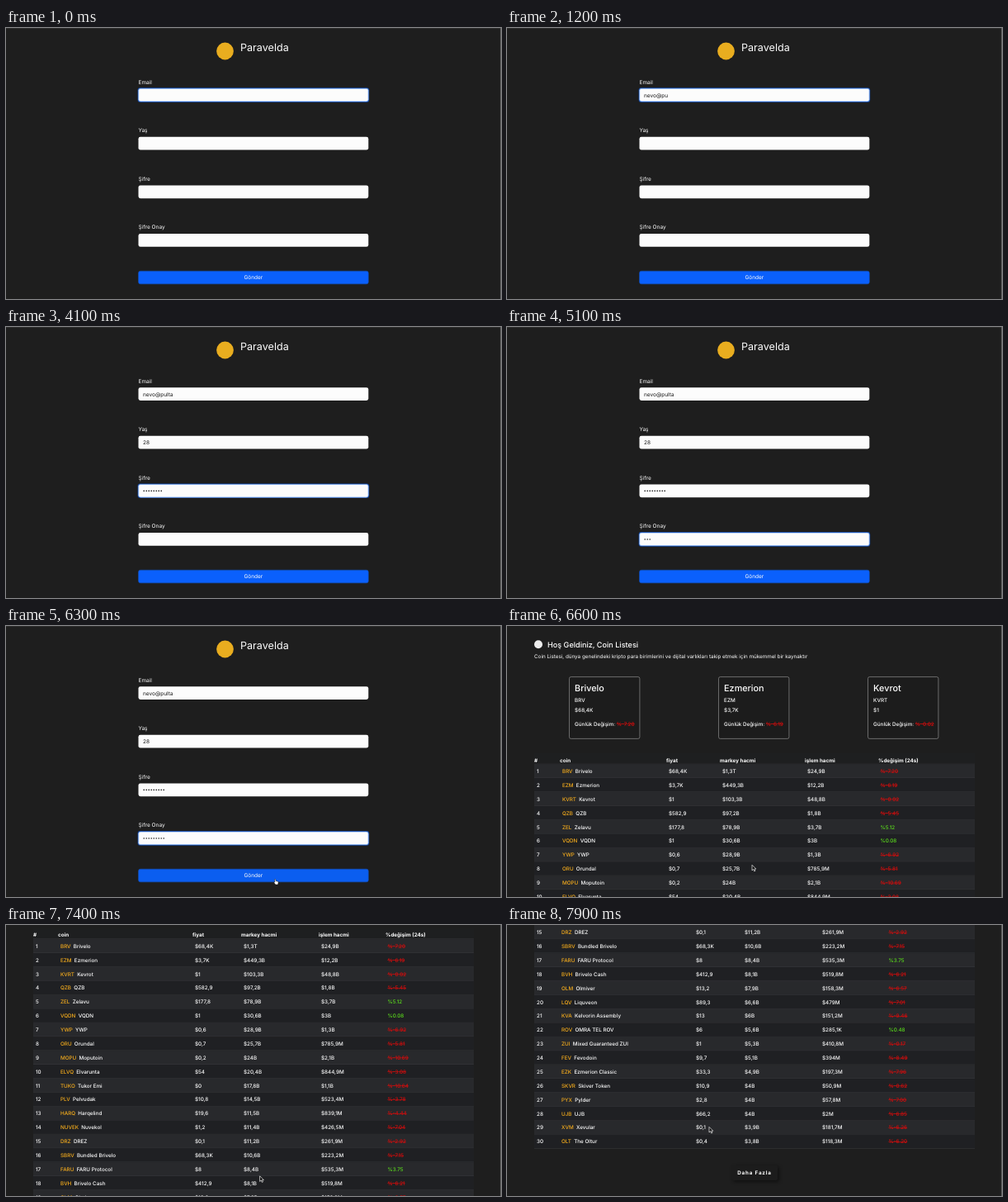
Animation, 600 px wide and 328 px high, one loop 8000 ms. Source, as an HTML page:

```html
<!DOCTYPE html>
<html lang="tr">
<head>
<meta charset="utf-8">
<title>Coin Listesi</title>
<style>
  html, body { margin: 0; width: 100%; height: 100%; overflow: hidden; background: #1e1e1e; }
  svg { display: block; width: 600px; height: 328px; font: 6.5px Inter, "Liberation Sans", sans-serif; fill: #fafafa; }
  text { white-space: pre; text-rendering: geometricPrecision; }
  #list { font-size: 6.3px; font-weight: 500; fill: #fff; }
  .title { font-size: 9.1px; }
  .big { font-size: 10.8px; }
  .head { font-weight: 700; }
  .ticker { fill: #f8ae1c; }
  .up { fill: #5bdc1c; }
  .down { fill: #d60c0c; text-decoration: line-through; }
  .typed { fill: #1b1b1b; }
  .more { filter: drop-shadow(2px 2px 2px rgba(0, 0, 0, .45)); }
</style>
</head>
<body>
<svg id="stage" viewBox="0 0 600 328"></svg>
<script>
const LOOP = 8000, STEP = 100;
const PAGE_AT = 6500, MORE_AT = 7400;
const PITCH = 16.88;
const EMAIL = 'nevo@pulta', AGE = '28';

// ticker | name | price | market volume | trade volume | change
const COINS = `BRV|Brivelo|68,4K|1,3T|24,9B|-7.20
EZM|Ezmerion|3,7K|449,3B|12,2B|-6.19
KVRT|Kevrot|1|103,3B|48,8B|-0.02
QZB|QZB|582,9|97,2B|1,8B|-5.45
ZEL|Zelavu|177,8|78,9B|3,7B|5.12
VQDN|VQDN|1|30,6B|3B|0.08
YWP|YWP|0,6|28,9B|1,3B|-6.92
ORU|Orundal|0,7|25,7B|785,9M|-5.81
MOPU|Moputoin|0,2|24B|2,1B|-10.69
ELVQ|Elvarunta|54|20,4B|844,9M|-3.08
TUKO|Tukor Emi|0|17,8B|1,1B|-10.64
PLV|Pelvudak|10,8|14,5B|523,4M|-3.78
HARQ|Harqelind|19,6|11,5B|839,1M|-4.44
NUVEK|Nuvekol|1,2|11,4B|426,5M|-7.04
DRZ|DREZ|0,1|11,2B|261,9M|-2.92
SBRV|Bundled Brivelo|68,3K|10,6B|223,2M|-7.15
FARU|FARU Protocol|8|8,4B|535,3M|3.75
BVH|Brivelo Cash|412,9|8,1B|519,8M|-6.21
OLM|Olmiver|13,2|7,9B|158,3M|-6.57
LQV|Liquveon|89,3|6,6B|479M|-7.01
KVA|Kelvorin Assembly|13|6B|151,2M|-9.46
ROV|OMRA TEL ROV|6|5,6B|285,1K|0.48
ZUI|Mixed Guaranteed ZUI|1|5,3B|410,8M|-0.17
FEV|Fevodoin|9,7|5,1B|394M|-8.49
EZK|Ezmerion Classic|33,3|4,9B|197,3M|-7.96
SKVR|Skiver Token|10,9|4B|50,9M|-0.62
PYX|Pylder|2,8|4B|57,8M|-7.00
UJB|UJB|66,2|4B|2M|-6.85
XVM|Xevular|0,1|3,9B|181,7M|-6.26
OLT|The Oltur|0,4|3,8B|118,3M|-6.20`.split('\n').map(row => row.split('|'));

const text = (x, y, s, attrs = '') => `<text x="${x}" y="${y}" ${attrs}>${s}</text>`;
const rect = (x, y, w, h, attrs = '') => `<rect x="${x}" y="${y}" width="${w}" height="${h}" ${attrs}/>`;
const span = (s, attrs) => `<tspan ${attrs}>${s}</tspan>`;
const trend = change => `class="${change[0] === '-' ? 'down' : 'up'}"`;
const clamp = v => Math.max(0, Math.min(1, v));

function field(label, i) {
  const y = 73.2 + i * 58.6;
  return text(160.5, y - 5.6, label) +
    rect(159.6, y - .9, 280.6, 17.6, `id="ring${i}" rx="3" fill="#12459f"`) +
    rect(160.5, y, 278.8, 15.8, 'rx="2.4" fill="#fcfcfc"') +
    rect(160.7, y + .2, 278.4, 15.4, `id="edge${i}" rx="2.3" fill="none" stroke="#6fa4f5" stroke-width=".6"`) +
    rect(165.8, y + 4, .6, 8, `id="caret${i}" fill="#333"`) +
    `<g id="value${i}" class="typed"></g>`;
}

function formPage() {
  return rect(0, 0, 600, .7, 'fill="#363636"') +
    '<circle cx="265.5" cy="28" r="10.4" fill="#e9ad1f"/>' +
    text(284, 28.3, 'Paravelda', 'font-size="12.6"') +
    ['Email', 'Yaş', 'Şifre', 'Şifre Onay'].map(field).join('') +
    rect(160.5, 294.2, 278.8, 15.6, 'id="send" rx="2.4" stroke="#1450b8" stroke-width=".6"') +
    text(299.8, 304.4, 'Gönder', 'text-anchor="middle"');
}

function card([ticker, name, price, , , change], i) {
  const x = 75.5 + i * 181;
  return rect(x, 46.4, 85.4, 74.8, 'rx="2" fill="#1c1c1c" stroke="#8d8d8d" stroke-width=".7"') +
    text(x + 6.6, 64, name, 'class="big"') +
    text(x + 6.6, 76.4, ticker) +
    text(x + 6.6, 88.8, '$' + price) +
    text(x + 6.6, 105.4, 'Günlük Değişim: ' + span('%' + change, trend(change)));
}

function table(id, count, cols) {
  const titles = ['#', 'coin', 'fiyat', 'markey hacmi', 'işlem hacmi', '%değişim (24s)'];
  const rows = COINS.slice(0, count).map(([ticker, name, price, market, trade, change], i) => {
    const top = 152.1 + i * PITCH, y = top + 10.7;
    const cell = (c, s, attrs) => text(cols[c] + (c === 5 ? 2.4 : 3), y, s, attrs);
    return rect(33, top, 534, PITCH, `fill="${i % 2 ? '#1f2023' : '#28292c'}"`) +
      rect(33, top + PITCH - .5, 534, .5, 'fill="#3a3b3f"') +
      cell(0, i + 1) +
      cell(1, span(ticker, 'class="ticker"') + ' ' + span(name, 'dx="1.6"')) +
      cell(2, '$' + price) + cell(3, '$' + market) + cell(4, '$' + trade) +
      cell(5, '%' + change, trend(change));
  }).join('');
  const end = 160.5 + (count - 1) * PITCH;
  return `<g id="${id}">` +
    rect(33, 139, 534, 13, 'fill="#1e1f20"') +
    rect(33, 151.6, 534, .5, 'fill="#3a3b3f"') +
    titles.map((s, c) => text(cols[c], 149.4, s, 'class="head"')).join('') + rows +
    rect(272, end + 28.5, 56, 18.5, 'rx="2" fill="#1c1c1c" class="more"') +
    text(300, end + 40.3, 'Daha Fazla', 'class="head" text-anchor="middle" letter-spacing=".8"') + '</g>';
}

function listPage() {
  return '<circle cx="38" cy="7" r="5" fill="#ededed"/>' +
    text(49, 10.4, 'Hoş Geldiniz, Coin Listesi', 'class="title"') +
    text(33, 23.9, 'Coin Listesi, dünya genelindeki kripto para birimlerini ve dijital varlıkları takip etmek için mükemmel bir kaynaktır', 'font-weight="400"') +
    COINS.slice(0, 3).map(card).join('') +
    table('short', 15, [33, 64, 193, 258, 361, 450]) +
    table('full', 30, [33, 63, 226, 285, 379, 460]);
}

const ink = 'fill="#111" stroke="#fff" stroke-width=".65" stroke-linejoin="round"';
document.getElementById('stage').innerHTML =
  rect(0, 0, 600, 328, 'fill="#1e1e1e"') +
  `<g id="form">${formPage()}</g><g id="list">${listPage()}</g>` +
  rect(599, 0, 1, 328, 'fill="#5a5a5a"') +
  `<path id="arrow" d="M0 0V6.6L1.6 5.2L2.7 7.6L3.9 7.1L2.8 4.8H4.8Z" ${ink}/>` +
  '<path id="hand" d="M1.2 .6Q2 0 2.3 .8L2.6 2.6L5 3.2Q5.8 3.4 5.6 4.4L5.1 7H2.2L.3 4.5Q0 3.8 1.4 4Z" fill="#fff" stroke="#111" stroke-width=".5"/>';

const el = id => document.getElementById(id);
const show = (id, on) => el(id).setAttribute('display', on ? 'inline' : 'none');
const move = (id, x, y) => el(id).setAttribute('transform', `translate(${x} ${y})`);

// eased value through [time, value] keys
function track(t, keys) {
  let [t0, v0] = keys[0];
  for (const [t1, v1] of keys) {
    if (t < t1) {
      const p = clamp((t - t0) / (t1 - t0));
      return v0 + (v1 - v0) * p * p * (3 - 2 * p);
    }
    [t0, v0] = [t1, v1];
  }
  return v0;
}

const typedCount = (t, start, gap, max) => Math.max(0, Math.min(max, Math.floor((t - start) / gap) + 1));
const FOCUS = [-1000, 1600, 2300, 4500, 9000];

function bullets(i, n) {
  const y = 81.2 + i * 58.6;
  return Array.from({ length: n }, (_, k) => `<circle cx="${167.2 + k * 3}" cy="${y}" r=".8"/>`).join('');
}

function drawForm(t) {
  for (let i = 0; i < 4; i++) {
    const glow = clamp((t - FOCUS[i]) / 150) * (1 - clamp((t - FOCUS[i + 1] + 60) / 150));
    el('ring' + i).setAttribute('opacity', glow);
    el('edge' + i).setAttribute('opacity', glow);
    show('caret' + i, t >= FOCUS[i] && t < FOCUS[i] + 200);
  }
  el('value0').innerHTML = text(166, 83.6, EMAIL.slice(0, typedCount(t, 300, 130, 10)));
  el('value1').innerHTML = text(166, 142.2, AGE.slice(0, typedCount(t, 1900, 200, 2)));
  el('value2').innerHTML = bullets(2, typedCount(t, 2500, 210, 9));
  el('value3').innerHTML = bullets(3, typedCount(t, 4800, 110, 9));
  el('send').setAttribute('fill', t >= 6200 ? '#0b5ef0' : '#0a60fc');
}

function drawList(t) {
  const scroll = track(t, [[PAGE_AT, -18], [6900, 0], [7300, 135], [MORE_AT, 135], [7900, 388]]);
  move('list', 0, -scroll);
  show('short', t < MORE_AT);
  show('full', t >= MORE_AT);
}

function draw(t) {
  const listed = t >= PAGE_AT;
  show('form', !listed);
  show('list', listed);
  show('hand', t >= 6200 && !listed);
  show('arrow', listed);
  if (listed) drawList(t); else drawForm(t);
  const x = track(t, [[6100, 336], [6300, 324.5], [PAGE_AT, 324.5], [6900, 148.6], [7000, 148.6], [7300, 307.6], [MORE_AT, 307.6], [7800, 245]]);
  const y = track(t, [[6100, 300], [6300, 306], [PAGE_AT, 306], [6900, 198.8], [7000, 198.8], [7300, 303.8], [MORE_AT, 303.8], [7800, 244.4]]);
  move(listed ? 'arrow' : 'hand', x, y);
}

const began = performance.now();
function tick() {
  const t = (performance.now() - began) % LOOP;
  draw(Math.floor(t / STEP) * STEP);
  requestAnimationFrame(tick);
}
tick();
</script>
</body>
</html>
```
